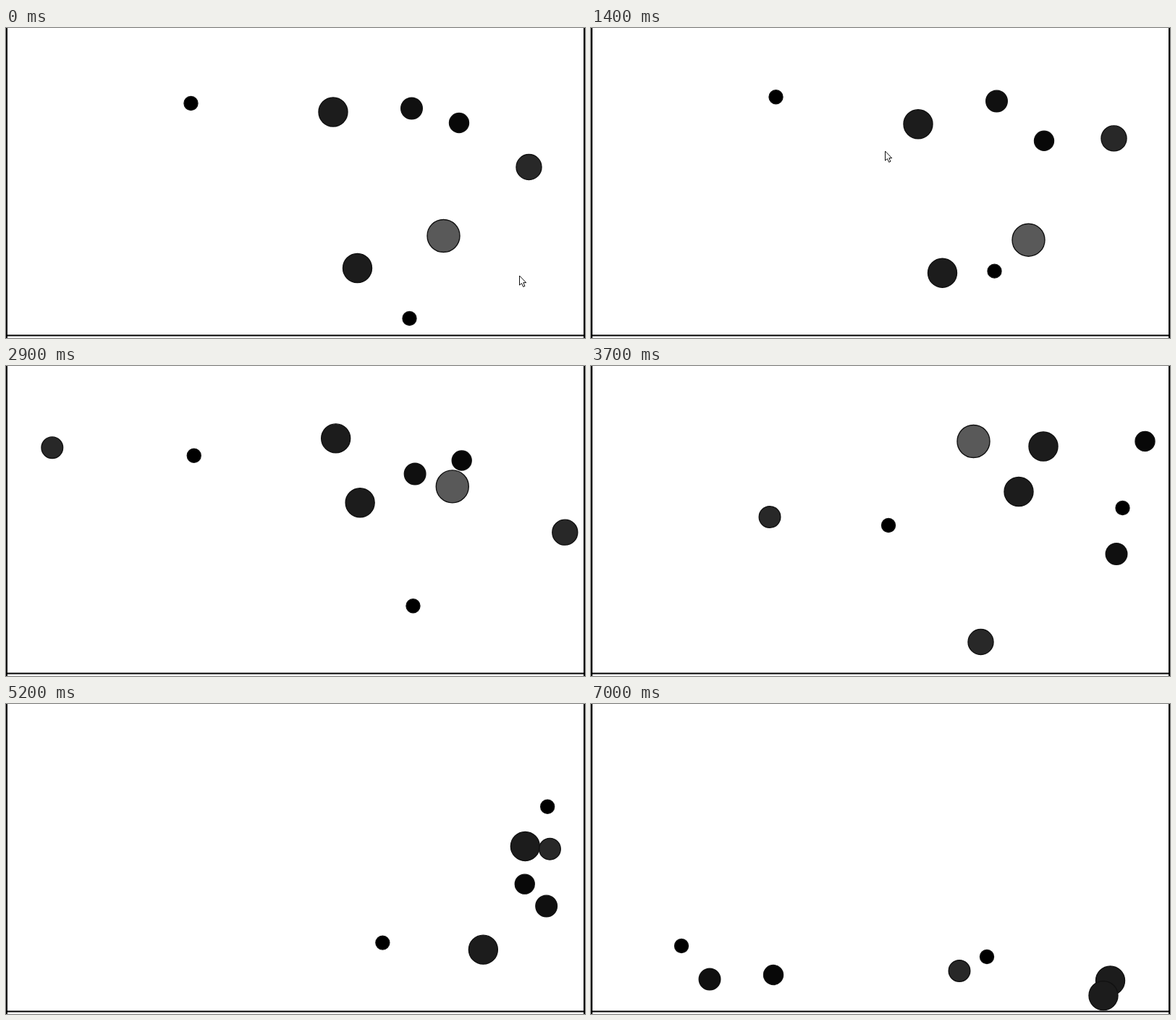
Write an HTML page that moves like this. It is 800x428 px and loops after 7.1 s.

```html
<!DOCTYPE html>
<html lang="en">
<head>
<meta charset="utf-8">
<title>Bouncing balls</title>
<style>
  html, body { margin: 0; width: 100%; height: 100%; overflow: hidden; background: #fff; }
  svg { display: block; width: 100vw; height: 100vh; }
</style>
</head>
<body>
<svg viewBox="0 0 800 428">
  <g id="balls"></g>
  <path id="cursor" d="M0 0V13L3 10.5L5.2 15.3L7.4 14.3L5.3 9.6H9.2Z" fill="#fff" stroke="#111" stroke-width="1"/>
  <path d="M1 0V428M799 0V428M0 424.5H800" fill="none" stroke="#000" stroke-width="2"/>
</svg>
<script>
const LOOP = 7.1, STEP = 0.1, FLOOR = 424;
const FALL = 49.4;   // square root of half the gravity
const WIND = -312;   // steady push to the left, px/s²
const KEYS = [0, 0.8, 2, 3.7, 4.5, 6, 7];

// x: rest, then positions at the last four keys; y: heights at all keys
const balls = [
  { r: 10, fill: '#000', x: [255.5, 411, 398, 657, 547], y: [104, 140, 127, 220, 402, 193, 349] },
  { r: 20.5, fill: '#1c1c1c', x: [452, 591, 577, 810, 717.5], y: [116, 102, 188, 173.5, 363, 195, 382] },
  { r: 15.3, fill: '#101010', x: [560.5, 726, 712.5, 612.5, 164], y: [111, 161, 105.5, 259.5, 351, 179, 380] },
  { r: 14, fill: '#080808', x: [626, 765.5, 753.5, 635, 252], y: [131, 98.5, 283, 104, 191.5, 376.5, 374] },
  { r: 18, fill: '#282828', x: [722.5, 538.5, 105, -2, -143], y: [192, 289, 96.5, 381, 211, 262, null], hit: 2.83 },
  { r: 23, fill: '#595959', x: [604.5, 528.5, 13.5, -400, -600], y: [287, 179, 352, 104, 181, null, null], hit: 3.12 },
  { r: 20.5, fill: '#1c1c1c', x: [485.5, 625, 615, 838, 708], y: [331.5, 210, 310, 111, 148, null, 402.5] },
  { r: 10, fill: '#000', x: [557.5, 734.5, 723, 596, 125], y: [401, 308, 193, 196, 137.5, 265, 334] },
  { r: 15.3, fill: '#282828', x: [null, 247, 230.5, -31.5, -291], y: [null, null, null, 208.5, 168.5, 329.5, 368.5], wrap: 800 }
];

const apex = t => 95 + 31 * Math.max(0, t - 3.7);

function hermite(t, t0, x0, v0, t1, x1, v1) {
  const d = t1 - t0, s = (t - t0) / d, s2 = s * s, s3 = s2 * s;
  return x0 * (2 * s3 - 3 * s2 + 1) + x1 * (3 * s2 - 2 * s3)
    + d * (v0 * (s3 - 2 * s2 + s) + v1 * (s3 - s2));
}

// Motion under the wind through two known points
function drift(t0, x0, t1, x1) {
  const v = (x1 - x0) / (t1 - t0) - WIND * (t1 - t0) / 2;
  return {
    x: t => x0 + v * (t - t0) + WIND / 2 * (t - t0) ** 2,
    v: t => v + WIND * (t - t0)
  };
}

function makeX({ x: [rest, a, b, c, d], r, hit }) {
  const one = drift(3.7, a, 4.5, b), two = drift(6, c, 7, d);
  return t => {
    if (t >= 5.2) return two.x(t);
    if (t > 4.6) return hermite(t, 4.6, one.x(4.6), one.v(4.6), 5.2, two.x(5.2), two.v(5.2));
    if (rest === null || t >= 3.7) return one.x(t);
    if (!hit) return t < 2.8 ? rest : hermite(t, 2.8, rest, 0, 3.7, a, one.v(3.7));
    if (t >= hit) return one.x(t);
    const s = Math.max(0, (t - hit + 0.3) / 0.3);
    return rest + (800 - r - rest) * s * s;
  };
}

// Bounce count at each key: whole numbers are apexes, halves are floor hits
function bounces({ y, r }, sign) {
  const phase = i => Math.sqrt((y[i] - apex(KEYS[i])) / (FLOOR - r - apex(KEYS[i]))) / 2;
  const at = [y[0] === null ? 0 : sign * phase(0)];
  let error = 0;
  for (let i = 1; i < KEYS.length; i++) {
    const height = FLOOR - r - apex((KEYS[i] + KEYS[i - 1]) / 2);
    const guess = at[i - 1] + FALL * (KEYS[i] - KEYS[i - 1]) / (2 * Math.sqrt(height));
    let best = guess;
    if (y[i] !== null) {
      const near = [phase(i), -phase(i)].map(p => p + Math.round(guess - p));
      best = Math.abs(near[0] - guess) < Math.abs(near[1] - guess) ? near[0] : near[1];
    }
    error += (best - guess) ** 2;
    at.push(best);
  }
  return { at, error };
}

function makeY(ball) {
  const up = bounces(ball, -1), down = bounces(ball, 1);
  const at = (up.error < down.error ? up : down).at;
  return t => {
    let i = 0;
    while (i < KEYS.length - 2 && t >= KEYS[i + 1]) i++;
    const n = at[i] + (at[i + 1] - at[i]) * (t - KEYS[i]) / (KEYS[i + 1] - KEYS[i]);
    const p = 2 * (n - Math.round(n)), top = apex(t);
    return top + (FLOOR - ball.r - top) * p * p;
  };
}

function addCircle({ r, fill }) {
  const c = document.createElementNS('http://www.w3.org/2000/svg', 'circle');
  const attrs = { r: r - 0.5, fill, stroke: '#111', 'stroke-width': 1.4 };
  for (const k in attrs) c.setAttribute(k, attrs[k]);
  document.getElementById('balls').append(c);
  return c;
}

const movers = balls.map(b => ({
  x: makeX(b), y: makeY(b),
  dots: (b.wrap ? [0, b.wrap] : [0]).map(dx => ({ dx, el: addCircle(b) }))
}));

const cursor = document.getElementById('cursor');

function drawCursor(t) {
  const s = Math.min(1, t / 0.8), e = s * s * (3 - 2 * s);
  const leave = Math.max(0, t - 1.5) / 0.2;
  const x = 709.5 - 303 * e + 12 * leave, y = 342 - 172 * e - 154 * leave;
  cursor.setAttribute('transform', `translate(${x} ${y})`);
  cursor.setAttribute('visibility', t < 1.75 ? 'visible' : 'hidden');
}

function draw(t) {
  for (const m of movers) {
    const x = m.x(t), y = m.y(t);
    for (const { dx, el } of m.dots) {
      el.setAttribute('cx', (x + dx).toFixed(2));
      el.setAttribute('cy', y.toFixed(2));
    }
  }
  drawCursor(t);
}

const start = performance.now();
function tick() {
  const t = Math.max(0, performance.now() - start) / 1000 % LOOP;
  draw(Math.floor(t / STEP + 1e-6) * STEP);
  requestAnimationFrame(tick);
}
tick();
</script>
</body>
</html>
```
